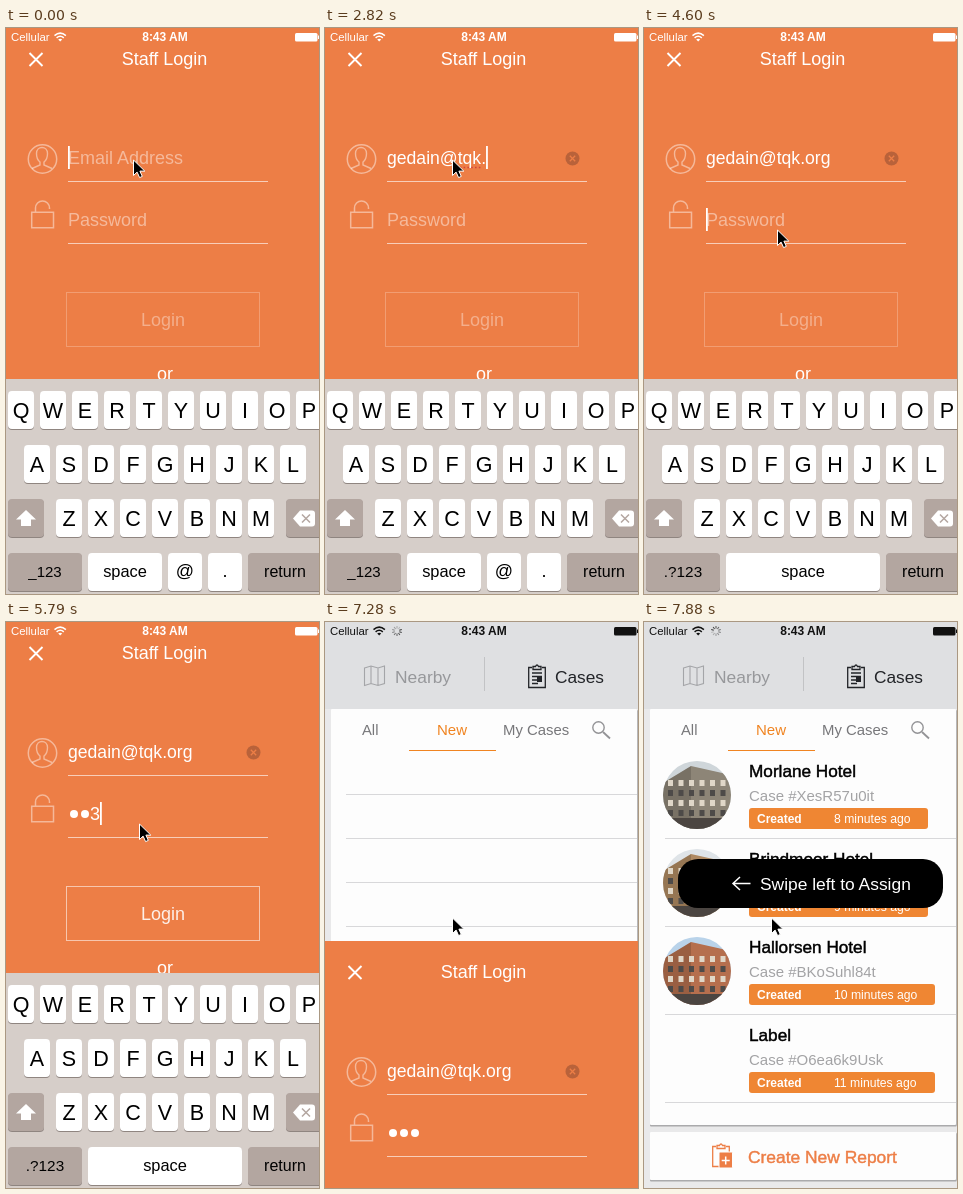
An HTML page for the animation above (8000 ms loop, 313 px wide and 566 px high).

```html
<!DOCTYPE html>
<html lang="en">
<head>
<meta charset="utf-8">
<title>Staff Login</title>
<style>
html, body { margin: 0; width: 100%; height: 100%; overflow: hidden; background: #e1e1e3; }
svg { display: block; width: 313px; height: 566px; font-family: "Liberation Sans", Arial, sans-serif; white-space: pre; }
</style>
</head>
<body>
<svg id="stage" viewBox="0 0 313 566"></svg>
<script>
const LOOP = 8000, TICK = 148.6;
const ORANGE = '#ed7e46', AMBER = '#ef8633';
const EMAIL = 'gedain@tqk.org', PASS = '123';
const EMAIL_TICKS = [1, 3, 4, 5, 6, 7, 12, 14, 16, 18, 19, 21, 22, 24];
const PASS_TICKS = [34, 37, 39];
const FOCUS_PASS = 30, SPIN = 46, DISMISS = 49, LOADED = 50;
const CASES = [
  { name: 'Morlane Hotel', id: 'XesR57u0it', age: 8, at: 51, wall: '#8d8577', sky: '#cfd6da' },
  { name: 'Brindmoor Hotel', id: 'FaIuvd7BAX', age: 9, at: 52, wall: '#b08a62', sky: '#dfe4e8' },
  { name: 'Hallorsen Hotel', id: 'BKoSuhl84t', age: 10, at: 52, wall: '#b56f4e', sky: '#b9d3ea' },
  { name: 'Label', id: 'O6ea6k9Usk', age: 11, at: 99 }
];

const stage = document.getElementById('stage');
const meter = document.createElement('canvas').getContext('2d');
meter.font = '17.6px "Liberation Sans", Arial, sans-serif';

const clamp = v => Math.max(0, Math.min(1, v));
const ease = v => { v = clamp(v); return v * v * (3 - 2 * v); };
const countDue = (ticks, k) => ticks.filter(v => v <= k).length;

const text = (s, x, y, size, fill, more = '') =>
  `<text x="${x}" y="${y}" font-size="${size}" fill="${fill}" ${more}>${s}</text>`;
const mid = (s, x, y, size, fill, more = '') => text(s, x, y, size, fill, 'text-anchor="middle" ' + more);
const medium = (s, x, y, size, fill) => text(s, x, y, size, fill, `stroke="${fill}" stroke-width=".45"`);
const rect = (x, y, w, h, fill, r = 0, more = '') =>
  `<rect x="${x}" y="${y}" width="${w}" height="${h}" rx="${r}" fill="${fill}" ${more}/>`;
const line = (d, stroke, w = 1, more = '') => `<path d="${d}" fill="none" stroke="${stroke}" stroke-width="${w}" ${more}/>`;
const disc = (x, y, r, fill, more = '') => `<circle cx="${x}" cy="${y}" r="${r}" fill="${fill}" ${more}/>`;
const group = (s, x, y, more = '') => `<g transform="translate(${x} ${y})" ${more}>${s}</g>`;
const white = a => `rgba(255,255,255,${a})`;

function statusBar(k, color) {
  let s = text('Cellular', 5, 13, 11.4, color) +
    mid('8:43 AM', 159, 13, 12, color, 'font-weight="bold"') +
    rect(289, 5, 22.5, 8.5, color, 1.5) + rect(312, 7.5, 1, 3.5, color);
  s += line('M48.5 7.6q5.7-5 11.4 0M50.6 9.8q3.6-3 7.2 0', color, 1.5) +
    `<path d="M52.2 11.4q2-1.5 4 0l-2 2.2z" fill="${color}"/>`;
  if (k >= SPIN)
    for (let i = 0; i < 10; i++)
      s += line('M0-2.4V-5', color, 1, `opacity="${.2 + .07 * ((i + 20 - k % 10) % 10)}" transform="translate(72 9) rotate(${-36 * i})"`);
  return s;
}

function formIcons() {
  const c = white(.45);
  return line('M30.5 125.5c0-8 11-8 11 0q0 6-3.5 8.5v3l8 3.5M30.5 125.5q0 6 3.5 8.5v3l-8 3.5', c, 1.4) +
    disc(36.5, 131, 14.2, 'none', `stroke="${c}" stroke-width="1.5"`) +
    line('M25.7 184.2h21.8v15.6H25.7zM29.5 184v-4a7 7 0 0 1 14 0v1', c, 1.5);
}

function caret(x, y) { return rect(x, y, 1.8, 23, '#fff'); }

function loginSheet(k) {
  const typed = EMAIL.slice(0, countDue(EMAIL_TICKS, k));
  const n = countDue(PASS_TICKS, k);
  const on = clamp((k - 33) / 3);
  const hint = white(.46);
  let s = rect(0, 0, 313, 566, ORANGE) +
    line('M23.5 25l13 13m0-13l-13 13', '#fff', 1.9) +
    mid('Staff Login', 158.5, 37, 18, '#fff') + formIcons() +
    line('M62 153.5h200M62 215.5h200', white(.62));

  if (typed) {
    s += text(typed, 62, 136, 17.6, '#fff') + disc(247.5, 130.5, 7, '#b9623a') +
      line('M244.8 127.8l5.4 5.4m0-5.4l-5.4 5.4', ORANGE, 1.3);
    if (k >= 19 && k < FOCUS_PASS)
      s += line('M131 139.5h26', '#d2453a', 1.5, 'stroke-dasharray="1.6 2.2"');
  } else s += text('Email Address', 62, 136, 18, hint);

  if (!n) s += text('Password', 62, 198, 18, hint);
  for (let i = 0; i < n; i++)
    s += i == n - 1 && k < DISMISS ? text(PASS[i], 62 + 11 * i, 198, 18, '#fff') : disc(68 + 11 * i, 192, 4, '#fff');

  if (k < FOCUS_PASS) {
    if (k != 11 && k != 27) s += caret(62 + meter.measureText(typed).width, 118);
  } else if (k < DISMISS && k != 43) s += caret(n ? 61 + 11 * n : 62, 180);

  return s + rect(60.5, 264.5, 193, 54, 'none', 0, `stroke="${white(.24 + .32 * on)}"`) +
    mid('Login', 157, 298, 18, white(.38 + .5 * on)) +
    mid('or', 159, 352, 18, '#fff');
}

function key(x, y, w, label, size = 21.5, dark = false) {
  return rect(x, y + 1, w, 38, '#8f8580', 4) + rect(x, y, w, 38, dark ? '#b3a6a0' : '#fff', 4) +
    mid(label, x + w / 2, y + (size > 20 ? 27 : 24), size, '#000');
}

function bottomRow(mail) {
  return mail
    ? key(2, 525, 74, '_123', 15, true) + key(82, 525, 74, 'space', 16.4) + key(162, 525, 34, '@', 18) + key(202, 525, 34, '.', 18)
    : key(2, 525, 74, '.?123', 15.3, true) + key(82, 525, 154, 'space', 16.4);
}

function keyboard(k) {
  let s = rect(0, 351, 313, 215, '#d6cec9');
  ['QWERTYUIOP', 'ASDFGHJKL', 'ZXCVBNM'].forEach((row, r) =>
    [...row].forEach((c, i) => s += key([2, 18, 50][r] + 32 * i, 363 + 54 * r, 26, c)));
  s += key(2, 471, 36, '', 16, true) + key(280, 471, 40, '', 16, true) + key(242, 525, 74, 'return', 16, true);
  s += '<path d="M20 482l10 9.5h-5v6.5h-10v-6.5h-5z" fill="#fff"/>' +
    '<path d="M287 490.500l7-8h12q3 0 3 3v10q0 3-3 3h-12z" fill="#fff"/>' +
    line('M296 486.5l8 8m0-8l-8 8', '#b3a6a0', 1.5);
  if (k <= FOCUS_PASS) s += bottomRow(true);
  if (k >= FOCUS_PASS) s += `<g opacity="${k == FOCUS_PASS ? .5 : 1}">` +
    rect(0, 523, 240, 43, '#d6cec9') + bottomRow(false) + '</g>';
  return s;
}

function photo(y, c) {
  let s = rect(-34, -34, 68, 68, c.sky) + `<path d="M-34-12L-6-29 34-20V34H-34z" fill="${c.wall}"/>` +
    `<path d="M-34-12L-6-29V34H-34z" fill="#000" opacity=".15"/>` + rect(-34, 23, 68, 11, '#4b4541');
  for (let i = 0; i < 6; i++)
    for (let j = 0; j < 4; j++) s += rect(-29 + 10.5 * i, -15 + 10 * j, 5, 6, j % 2 ? '#4d4a48' : '#e0d7c8');
  return group(`<g clip-path="url(#round)">${s}</g>`, 53, y);
}

function caseRow(c, i, k) {
  const y = 88 * i, ready = k >= c.at;
  const w = k == LOADED ? 193 : c.age < 10 ? 179 : 186;
  return (ready ? photo(173 + y, c) : '') +
    medium(ready ? c.name : 'Label', 105, 155 + y, 17.2, '#000') +
    text('Case #' + c.id, 105, 179 + y, 15, '#a3a3a5') +
    rect(105, 186 + y, w, 21, AMBER, 3) +
    text('Created', 113, 201 + y, 12, '#fff', 'font-weight="bold"') +
    text(c.age + ' minutes ago', 190, 201 + y, 12.2, '#fff') +
    line(`M21 ${216.5 + y}h291`, '#d8d8da');
}

const card = (y, h) => rect(6, y + 1, 306.8, h + .6, '#aaaaac', 1) + rect(6, y, 306, h, '#fdfdfd', 1);

function clipboard(color) {
  return line('M4 3.500H.7v20h16.600v-20H14M5 2.500h2.500q1.500-3 3 0H13v3H5z', color, 1.3);
}

function caseList(k) {
  const gray = '#77777a', ink = '#222428';
  let s = rect(0, 0, 313, 566, '#e9e9ea') + rect(0, 0, 313, 87, '#dfe0e2') + card(87, 416) + card(510, 48);
  s += line('M39.500 46l6.500-2 7 2 6.500-2v17.500l-6.500 2-7-2-6.500 2zM46 44v17.500M53 46v17.500', '#a4a5a8', 1.1) +
    text('Nearby', 70, 61, 17.4, '#97989b') + line('M159.500 35v34', '#c2c3c5') +
    group(clipboard(ink) + line('M4 9h10M4 12.500h10M4 16h6M4 19.500h6', ink, 1.300) + rect(9, 13, 5, 5, ink), 203, 42) +
    text('Cases', 230, 61, 17.3, ink);
  s += text('All', 37, 113, 14.8, gray) + text('New', 112, 113, 15, '#f08421') + text('My Cases', 178, 113, 14.9, gray) +
    disc(273.500, 105.500, 5.7, 'none', 'stroke="#939396" stroke-width="1.4"') +
    line('M278 110l7 6.500', '#939396', 1.8) + line('M84 128.500h87', '#f08421', 1.2);
  if (k < LOADED)
    return s + line('M21 172.500h291M21 216.500h291M21 260.500h291M21 304.500h291', '#d8d8da');

  s += CASES.map((c, i) => caseRow(c, i, k)).join('');
  s += group(clipboard(ORANGE) + rect(7, 9, 13.500, 16, ORANGE, 1, 'stroke="#fdfdfd"') +
    line('M13.700 13.500v8m-4-4h8', '#fff', 1.500), 68, 521) +
    medium('Create New Report', 104, 541, 17.4, ORANGE);
  return s;
}

function toast(k) {
  const a = [.25, .75, 1, 1][k - LOADED];
  return `<g>${rect(34, 237, 265, 49, '#000', 20, `opacity="${a}"`)}` +
    line('M106.500 261.500H89m7-6.500l-7 6.500 7 6.500', '#fff', 1.5) +
    text('Swipe left to Assign', 116, 268, 17.4, '#fff') + '</g>';
}

function pointer(k) {
  const a = ease((k - 25) / 3), b = ease((k - 40) / 5);
  return group('<path d="M0 0v15.500l3.600-3.400 2.500 5.500 2.700-1.200-2.400-5.300h4.900z" fill="#000" stroke="#fff"/>',
    127.500 + 6 * a - 6 * b, 132 + 70 * a + 94 * b);
}

function scene(k) {
  const defs = '<clipPath id="round"><circle r="34"/></clipPath>';
  if (k < DISMISS) return loginSheet(k) + keyboard(k) + statusBar(k, '#fff') + pointer(k);
  const drop = [319, 540][k - DISMISS];
  return defs + caseList(k) + (k >= LOADED ? toast(k) : '') +
    (drop ? group(loginSheet(k), 0, drop) : '') + statusBar(k, '#111') + pointer(k);
}

const start = performance.now();
let shown = -1;
function draw(now) {
  const t = Math.max(0, now - start) % LOOP;
  const k = Math.min(53, Math.floor((t + 12) / TICK));
  if (k != shown) stage.innerHTML = scene(shown = k);
  requestAnimationFrame(draw);
}
draw(start);
</script>
</body>
</html>
```
